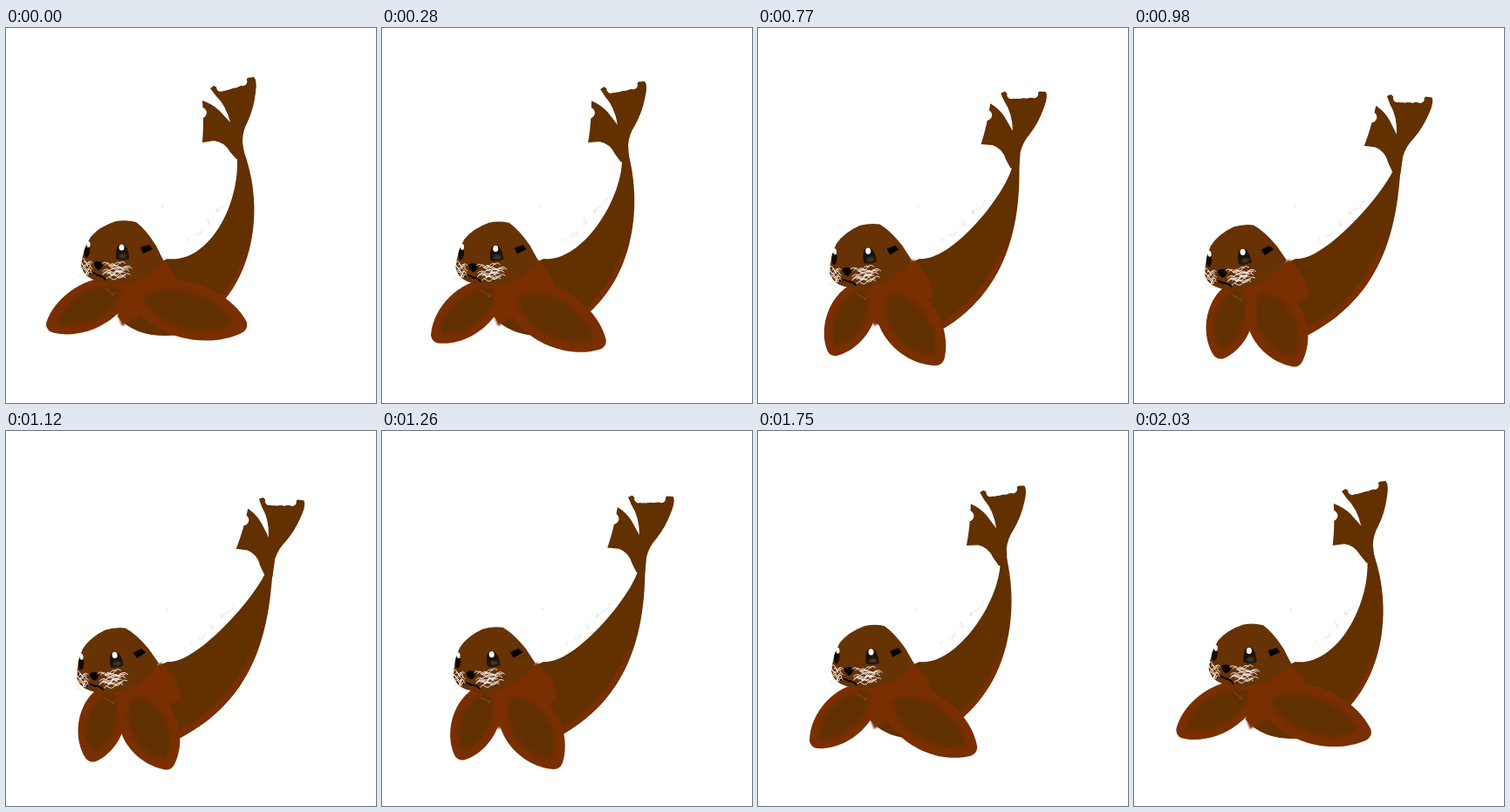
An HTML page with a canvas for the animation above (2.1 s loop, 424 by 429 pixels).

```html
<!DOCTYPE html>
<html lang="en">
<head>
<meta charset="utf-8">
<title>Seal</title>
<style>
  html, body { margin: 0; width: 100%; height: 100%; overflow: hidden; background: #fff; }
  canvas { display: block; width: 424px; height: 429px; }
</style>
</head>
<body>
<canvas id="stage" width="424" height="429"></canvas>
<script>
const ctx = document.getElementById('stage').getContext('2d');
const STEP = 70, STEPS = 30;
const BROWN = '#633000', HEAD = '#673204', RUST = '#7a2f02', CORE = '#613000';
const TAIL_HINGE = [231, 268], TAIL_SWING = 17.5;

const shape = d => new Path2D(d);
const rad = deg => deg * Math.PI / 180;
const mix = (a, b, u) => a.map((v, i) => v + (b[i] - v) * u);

function spin([x, y], [cx, cy], deg) {
  const c = Math.cos(rad(deg)), s = Math.sin(rad(deg));
  return [cx + (x - cx) * c - (y - cy) * s, cy + (x - cx) * s + (y - cy) * c];
}

function turned([x, y], deg, draw) {
  ctx.save();
  ctx.translate(x, y);
  ctx.rotate(rad(deg));
  ctx.translate(-x, -y);
  draw();
  ctx.restore();
}

function seeded(seed) {
  return () => (seed = (seed * 16807) % 2147483647) / 2147483647;
}

function fill(path, color, blur = 0.7) {
  ctx.filter = `blur(${blur}px)`;
  ctx.fillStyle = color;
  ctx.fill(path);
  ctx.filter = 'none';
}

function line(path, color, width) {
  ctx.strokeStyle = color;
  ctx.lineWidth = width;
  ctx.stroke(path);
}

function oval(x, y, rx, ry, color, blur = 0.5, tilt = 0) {
  const path = new Path2D();
  path.ellipse(x, y, rx, ry, tilt, 0, 7);
  fill(path, color, blur);
}

const fluke = shape(`M257 142Q250 130 238 129L225 131Q227 108 225 83Q237 87 245 95L257 108
  Q252 88 240 77L234 69L238 66L250 72L270 66L277 57L284 56Q288 60 286 74
  Q284 92 277 107Q271 118 271 130L274 150L264 150Z`);
const skull = shape(`M181 267L172 249Q160 230 149 222Q138 219 126 221Q107 227 97 239
  Q88 254 86 271Q88 285 106 290Q148 301 181 267Z`);
const chest = shape('M116 290L178 265Q198 282 201 308Q165 320 133 341L124 318Z');

// Wavy strands fanning out from the muzzle; a negative reach grows leftwards.
function hairs(seed, count, x, y, height, reach) {
  const rnd = seeded(seed), path = new Path2D();
  for (let i = 0; i < count; i++) {
    let px = x + rnd() * reach * 0.35, py = y + height * (i + rnd()) / count;
    const drift = rnd() * 3 - 1.5;
    path.moveTo(px, py);
    for (let k = 0; k < 3; k++) {
      const nx = px + reach * (0.15 + rnd() * 0.12), ny = py + drift + rnd() * 3 - 1.5;
      path.quadraticCurveTo((px + nx) / 2, py + (k % 2 ? 4 : -4), nx, ny);
      [px, py] = [nx, ny];
    }
  }
  return path;
}
const whiskers = [hairs(41, 15, 110, 269, 18, 33), hairs(87, 10, 99, 268, 15, -17)];

const specks = shape('M179 206l1 -3');
const rnd = seeded(9);
for (let i = 0; i < 14; i++) {
  const t = rnd(), x = 207 + 45 * t + rnd() * 6, y = 250 - 50 * t - rnd() * 8;
  specks.moveTo(x, y);
  specks.lineTo(x + 1 + rnd() * 2, y - 1 - rnd() * 3);
}

function drawTrunk(u) {
  const onTail = (x, y) => spin([x, y], TAIL_HINGE, TAIL_SWING * u);
  const left = onTail(264, 138), right = onTail(271, 137);
  const back = [...mix([272, 195], [307, 166], u), ...mix([235, 270], [221, 268], u)];
  const under = [...mix([300, 210], [302, 205], u), ...mix([285, 310], [299, 299], u)];

  const edge = new Path2D();
  edge.moveTo(...right);
  edge.bezierCurveTo(...under, 200, 351);

  const body = new Path2D(edge);
  body.quadraticCurveTo(150, 357, 128, 330);
  body.lineTo(150, 280);
  body.lineTo(185, 264);
  body.bezierCurveTo(back[2], back[3], back[0], back[1], ...left);
  body.closePath();
  fill(body, BROWN);

  const fade = ctx.createLinearGradient(0, 230, 0, 280);
  fade.addColorStop(0, 'rgba(122,47,2,0)');
  fade.addColorStop(1, RUST);
  ctx.save();
  ctx.clip(body);
  ctx.filter = 'blur(1.5px)';
  line(edge, fade, 10 + 6 * u);
  ctx.restore();
}

function drawFluke() {
  fill(fluke, BROWN);
  oval(223, 97, 7, 6.5, '#fff');
  for (let i = 0; i < 4; i++) oval(246 + 8.5 * i, 68 - 2.2 * i, 4.8, 4.8, '#fff');
}

// Blunt leaf from base to tip.
function leaf([x, y], [tx, ty], w, blunt) {
  const len = Math.hypot(tx - x, ty - y), path = new Path2D();
  const unit = shape(`M0 0C${len * 0.2} ${-w * 1.4} ${len * 0.75} ${-w * 1.3} ${len - 1} ${-blunt}
    Q${len + 3} 0 ${len - 1} ${blunt}C${len * 0.75} ${w * 1.3} ${len * 0.2} ${w * 1.4} 0 0Z`);
  path.addPath(unit, new DOMMatrix([x, y].length && [1, 0, 0, 1, x, y])
    .rotate(Math.atan2(ty - y, tx - x) * 180 / Math.PI));
  return path;
}

function drawFin(base, tip, w) {
  fill(leaf(base, tip, w, 6), RUST);
  fill(leaf(mix(base, tip, 0.13), mix(base, tip, 0.88), w * 0.64, 3), CORE, 2);
}

function drawHead() {
  fill(skull, HEAD);

  oval(93, 255, 3.2, 7.5, '#130a05', 0.6, 0.15);
  oval(94.5, 247.5, 2, 3.5, '#fff');

  fill(shape('M126 264Q125 248 132 247Q140 247 141 264Q134 267 126 264Z'), '#1b120c');
  oval(134, 261, 4.5, 2.5, '#4a3728', 1);
  oval(132.5, 251, 3, 3.6, '#fff');

  fill(shape('M154 251L164 248L168 253L157 258Z'), '#050302');
  fill(shape('M101 268Q106 265 111 269Q112 274 106 277Q100 273 101 268Z'), '#050302', 0.5);
  line(shape('M96 281Q101 279 105 283Q110 283 114 288'), '#080402', 2);
  for (const tuft of whiskers) line(tuft, '#f6f1ed', 0.9);
  line(shape('M114 298Q119 301 124 306M122 306L125 302'), 'rgba(165,112,70,.6)', 0.7);
}

function draw(u) {
  ctx.fillStyle = '#fff';
  ctx.fillRect(0, 0, 424, 429);
  ctx.lineCap = ctx.lineJoin = 'round';
  turned([200, 290], 4 * u, () => line(specks, '#d4d4d4', 0.7));
  drawTrunk(u);
  turned(TAIL_HINGE, TAIL_SWING * u, drawFluke);
  fill(chest, RUST, 1);
  drawFin(mix([145, 292], [122, 286], u), spin([48, 343], [116, 298], -46 * u), 25);
  drawFin(mix([140, 303], [140, 290], u), spin([275, 342], [187, 275], 56 * u), 31);
  turned([167, 310], -8.6 * u, drawHead);
}

let shown = -1;
function tick() {
  const step = Math.floor(performance.now() / STEP) % STEPS;
  if (step !== shown) {
    shown = step;
    draw(1 - Math.abs(step - STEPS / 2) / (STEPS / 2));
  }
  requestAnimationFrame(tick);
}
tick();
</script>
</body>
</html>
```
